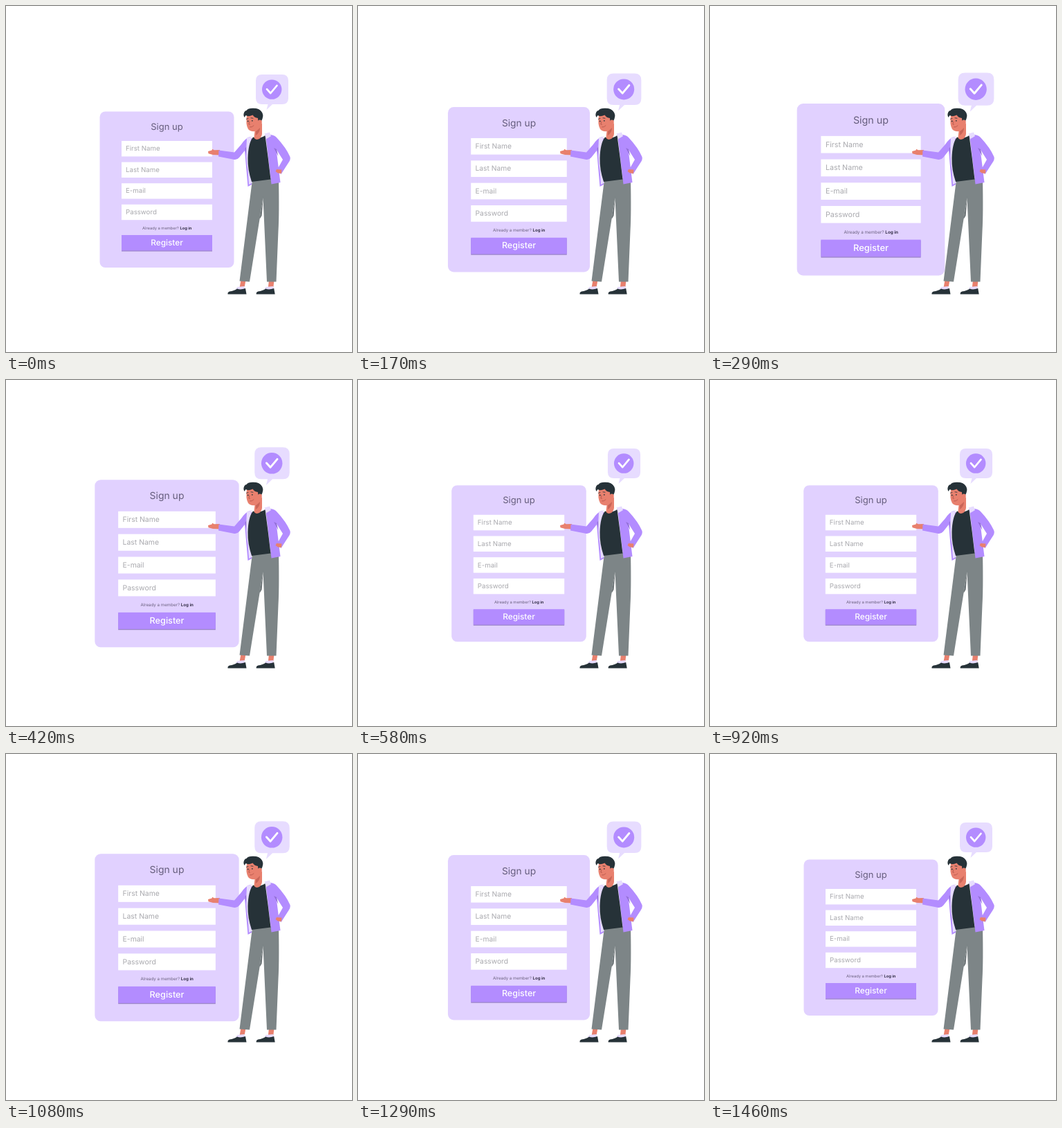
An HTML page for the animation above (1.5 s loop, 500 by 500 pixels).

```html
<!DOCTYPE html>
<html lang="en">
<head>
<meta charset="utf-8">
<title>Sign up</title>
<style>
  html, body { margin: 0; width: 100%; height: 100%; overflow: hidden; background: #fff; }
  svg { display: block; width: 100vw; height: 100vh; }
  text { font-family: Inter, sans-serif; text-rendering: geometricPrecision; }
  .label { font-size: 9.7px; fill: #a9a9ae; }
  .mid { text-anchor: middle; }
  .lilac { fill: #b38cff; }
  .pale { fill: #e7dcff; }
  .dark { fill: #263238; }
  .skin { fill: #e8806e; }
  .line { fill: none; stroke-linecap: round; stroke-linejoin: round; }
</style>
</head>
<body>
<svg viewBox="0 0 500 500">
  <g id="panel">
    <rect x="135.5" y="152.5" width="194" height="225.5" rx="8" fill="#e1d1ff"/>
    <text class="mid" x="232.5" y="178.6" font-size="13" fill="#655d7c">Sign up</text>
    <g id="fields"></g>
    <text class="mid" x="232.7" y="322.9" font-size="5.75" fill="#6c627f">Already a member? <tspan font-weight="700" fill="#37324a">Log in</tspan></text>
    <rect x="167" y="332" width="131" height="22.6" fill="#9c86c8"/>
    <rect class="lilac" x="167" y="331" width="131" height="22.4"/>
    <text class="mid" x="232.5" y="345.6" font-size="11.8" font-weight="500" fill="#fff">Register</text>
  </g>

  <g id="bubble">
    <path class="pale" d="M370 99H399Q408 99 408 108V133Q408 142 399 142H385L376.5 150L378.5 142H370Q361 142 361 133V108Q361 99 370 99Z"/>
    <circle class="lilac" cx="384.2" cy="120.6" r="14.2"/>
    <path class="line" d="M377 120.2L382.3 126L391.5 115" stroke="#fff" stroke-width="2.7"/>
  </g>

  <g id="man">
    <path class="skin" d="M339.5 396H346.5L344 410H337ZM380 396H387.5L386 410H378.5Z"/>
    <path class="pale" d="M334 406L345 405L345 410H332ZM375 406L386.500 405V410H374Z"/>
    <path id="shoe" class="dark" d="M320.500 416.500Q320 413.500 323 412.500Q330 411.500 334 408.500Q339 410.500 346 408L347.500 416.500Z"/>
    <use href="#shoe" x="41.200"/>
    <path fill="#7d8587" d="M356 251L394 249Q395 300 393.500 325L390.500 398.500H377L371.500 277L352 398.500L337.500 397.500Z"/>
    <path fill="#61696c" d="M372 275L369.500 303L366.500 308Z"/>

    <path class="skin" d="M309 208L301 208.300L298 206.800L297.500 208.600L292 210L292.500 213.200L299 215L309 215.500Z"/>
    <path class="lilac" d="M352 189Q345 192 340 200L330 211.500L307.500 208.500L307 217.500L330 222Q334 222.500 337 219L345 209L349.500 261L355 258L356 192Z"/>
    <path class="lilac" d="M375 186Q386 185 391 190Q405 205 410.500 218Q411.500 222 408.500 226L397.500 243L391 238L400 222L390.500 207L396.500 255L383.500 257.500Z"/>
    <path d="M345.500 206L347.500 203L350 229Z" fill="#9370d8"/>
    <path d="M387 205L391 207L393.500 217Z" fill="#9370d8"/>
    <path class="skin" d="M398.500 236.500L391 236L389.500 239L393 241.500L398 242Z"/>
    <path class="pale" d="M355 188L348 191Q346 220 349.500 237L351 258L355 256L354 194Z"/>
    <path class="dark" d="M357 189.500Q366 193 374.500 187Q379 220 382.500 250.500L355 254Q349 236 349.500 220Q350 198 357 189.500Z"/>
    <path class="pale" d="M373.500 184.500L381 182.500L383 188L376.500 192Z"/>

    <path class="skin" d="M360 176L370 169V185Q369 192 362.500 193Q358.500 192 358.500 189.500Z"/>
    <path d="M361 181L367 176Q367 183 361 187Z" fill="#c96558"/>
    <path class="skin" d="M348 158Q353 154 366 156L369 165Q368 177 362 180.500Q355 183 350 178Q346 171 348 158Z"/>
    <path class="dark" d="M343.500 158.500Q343 152 347.500 151Q350 147.500 357 147.700Q366 147.500 369.500 153Q372.500 157 370.500 163L367.500 170L364.500 168L364 162Q359 161.500 356.500 157.500Q350 160.500 346.500 158L344.500 161Z"/>
    <circle class="skin" cx="366.800" cy="167.500" r="3"/>
    <circle class="dark" cx="349.700" cy="166.500" r=".9"/>
    <circle class="dark" cx="355.800" cy="165.800" r=".9"/>
    <path class="line" d="M347.500 163.300L350 162.500M354 161.800L357 162.200" stroke="#263238" stroke-width=".8"/>
    <path class="line" d="M352 167L350.800 171L352.500 171.200M352.500 175Q356 175.500 358 172.800" stroke="#a94c43" stroke-width=".7"/>
  </g>
</svg>
<script>
  const LOOP = 1500, FPS = 24, PULSE = 14.8, SWELL = 0.102;
  const byId = id => document.getElementById(id);

  byId('fields').innerHTML = ['First Name', 'Last Name', 'E-mail', 'Password'].map((label, i) =>
    `<g transform="translate(0 ${i * 30.6})">
       <rect x="167" y="195" width="131" height="22.4" fill="#fff"/>
       <text class="label" x="173" y="209.3">${label}</text>
     </g>`).join('');

  const scaleAbout = (id, x, y, s) =>
    byId(id).setAttribute('transform', `translate(${x} ${y}) scale(${s}) translate(${-x} ${-y})`);

  // The pulse runs forward for 18 steps, then back, skipping one step near the peak.
  function pulseStep(step) {
    if (step <= 18) return step;
    return Math.max(0, (step < 29 ? 36 : 35) - step);
  }

  function draw(now) {
    const step = Math.floor((now % LOOP + 5) * FPS / 1000);
    const s = 1 + SWELL * (1 - Math.cos(2 * Math.PI * pulseStep(step) / PULSE)) / 2;
    scaleAbout('panel', 232.5, 265.3, s);
    scaleAbout('bubble', 384.5, 124, s);
  }

  const start = performance.now();
  function tick() {
    draw(performance.now() - start);
    requestAnimationFrame(tick);
  }
  tick();
</script>
</body>
</html>
```
